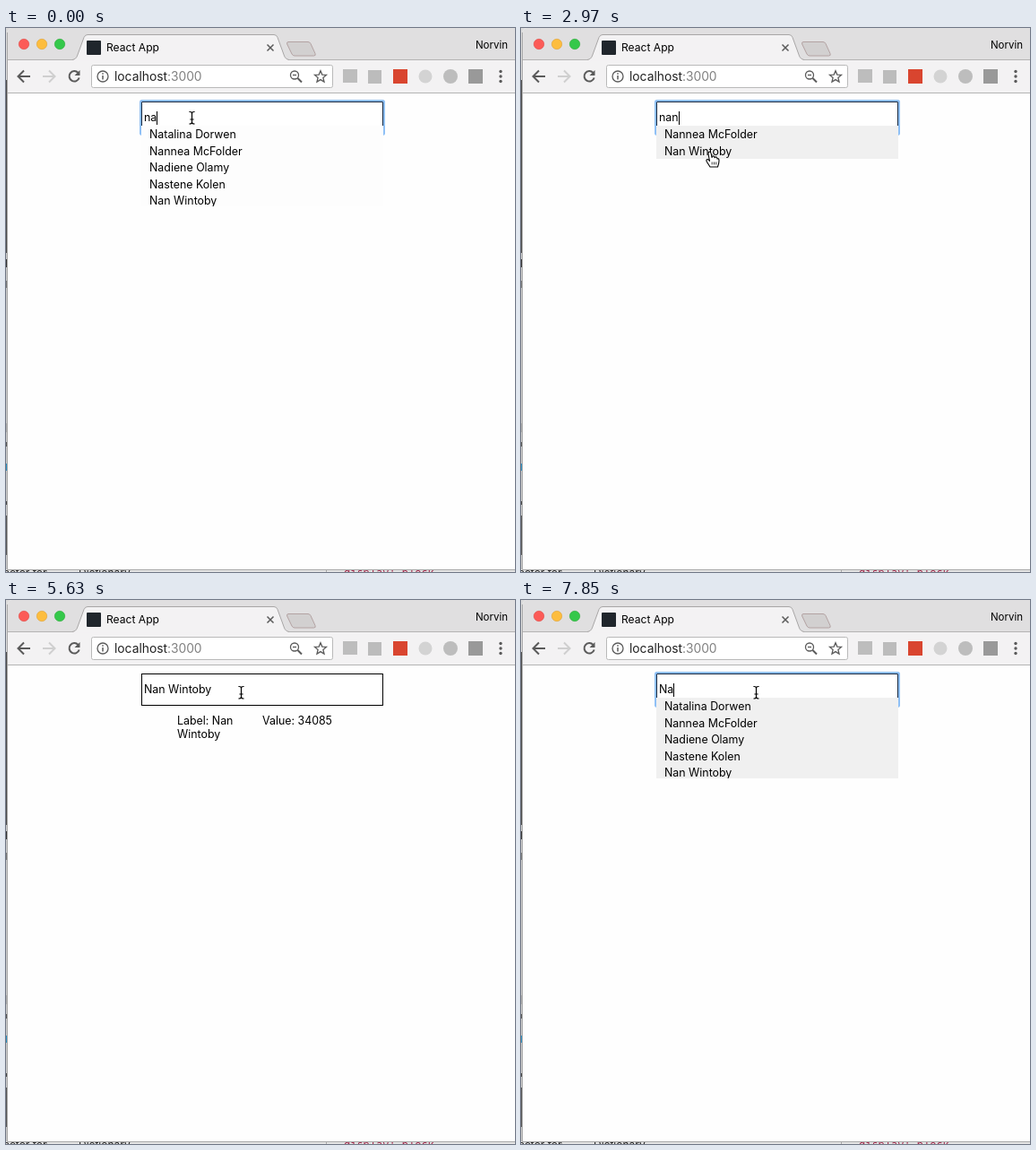
An HTML page for the animation above (8000 ms loop, 568 px wide and 607 px high).

```html
<!DOCTYPE html>
<html lang="en">
<head>
<meta charset="utf-8">
<title>Autocomplete demo</title>
<style>
  html, body { margin: 0; width: 100%; height: 100%; overflow: hidden; background: #fefefe; }
  #stage { position: relative; width: 568px; height: 607px; overflow: hidden;
    font: 12.4px/18px Inter, Roboto, sans-serif; color: #000; }
  #stage > * { position: absolute; }
  svg { left: 0; top: 0; overflow: visible; }
  #field { left: 151px; top: 82px; width: 268px; height: 34px; border: 1px solid #000; background: #fff; }
  #field.focus { border-color: #16283f; box-shadow: 0 0 0 2px #8fc0f6; border-radius: 1px; }
  #query { left: 154px; top: 91px; white-space: pre; }
  #caret { display: inline-block; width: 1px; height: 15px; margin-right: -1px; background: #000; vertical-align: -3.5px; }
  #list { left: 151px; top: 109px; width: 270px; max-height: 90px; overflow: hidden; }
  #list div { height: 18.5px; line-height: 20px; padding-left: 9px; }
  .detail { top: 127px; line-height: 15px; }
</style>
</head>
<body>
<div id="stage">
  <svg id="chrome" width="568" height="607" viewBox="0 0 568 607">
    <!-- windows behind -->
    <rect width="568" height="607" fill="#dcdcdc"/>
    <g id="edge"></g>
    <rect y="604" width="568" height="3" fill="#e4e4e4"/>
    <g font-family="Inter, sans-serif" font-size="12" fill="#222">
      <text x="-3" y="612">ector for</text>
      <text x="81" y="612">Dictionary</text>
      <text x="377" y="612" fill="#a3264a" font-family="Noto Sans Mono, monospace">display: block</text>
    </g>
    <path d="M45.5 604v3M357.5 604v3" stroke="#aaa"/>

    <!-- browser window -->
    <path d="M2 604V5Q2 0 7 0H568V604Z" fill="#fefefe"/>
    <path d="M2 36V5Q2 0 7 0H568V36Z" fill="#e0dfe0"/>
    <path d="M1.5 5V604.5H568" fill="none" stroke="#a9a9a9"/>
    <rect x="2" y="36" width="566" height="36" fill="#f3f2f3"/>
    <path d="M2 35.5H568" stroke="#b4b3b3"/>
    <path d="M2 72.5H568" stroke="#b3b3b3"/>
    <path d="M74 36.5V35.5C77 35 78.500 33.500 79.500 31L87 10.500Q88.300 7.500 91 7.500H299Q302 7.500 303 10.500L310.500 31C311.500 33.500 313 35 316 35.500V36.500Z" fill="#f3f2f3"/>
    <path d="M74 35.500C77 35 78.500 33.500 79.500 31L87 10.500Q88.300 7.500 91 7.500H299Q302 7.500 303 10.500L310.500 31C311.500 33.500 313 35 316 35.500" fill="none" stroke="#a8a6a6"/>
    <path d="M315 15.500H337Q339 15.500 340 17.500L345 28.500Q346 31 343.500 31H322Q320 31 319 29L313.700 18Q313 15.500 315 15.500Z" fill="#d2d0d0" stroke="#b3a2a2"/>
    <circle cx="20" cy="18" r="5.700" fill="#fc5b57" stroke="#df4744" stroke-width=".6"/>
    <circle cx="40" cy="18" r="5.700" fill="#fdbd3e" stroke="#dea034" stroke-width=".6"/>
    <circle cx="60" cy="18" r="5.700" fill="#34c84a" stroke="#27aa35" stroke-width=".6"/>
    <rect x="90" y="14" width="16" height="16" rx="1" fill="#20262c"/>
    <path d="M291.500 18.500l7 7m0-7l-7 7" stroke="#5a5a5a" stroke-width="1.500"/>

    <!-- toolbar -->
    <g fill="none" stroke="#5a5a5a" stroke-width="2">
      <path d="M27 54H14M20 47.500L13.500 54L20 60.500"/>
      <path d="M41 54H54M48 47.500L54.500 54L48 60.500" stroke="#cfcfcf"/>
      <path d="M80.500 50A5.700 5.700 0 1 0 81.700 55.500"/>
    </g>
    <path d="M82.500 47V53H76.500Z" fill="#5a5a5a"/>
    <rect x="95.500" y="41.500" width="269" height="25" rx="2" fill="#fff" stroke="#b9b9b9"/>
    <g fill="none" stroke="#5a5a5a" stroke-width="1.300">
      <circle cx="108" cy="54" r="6"/>
      <path d="M108 53V57.500M108 50.300V51.800" stroke-width="1.500"/>
      <circle cx="322" cy="52.500" r="4.500"/>
      <path d="M325.500 56L330 60.500" stroke-width="2"/>
      <path d="M320 52.500H324"/>
      <path d="M351 47.700L352.800 52.100L357.500 52.400L353.900 55.500L355 60.100L351 57.600L347 60.100L348.100 55.500L344.500 52.400L349.200 52.100Z"/>
    </g>
    <rect x="376" y="46" width="16" height="15" fill="#bdbdbd"/>
    <rect x="404" y="47" width="15" height="15" fill="#bcbcbc"/>
    <rect x="432" y="46" width="16" height="16" fill="#d9452f"/>
    <circle cx="468" cy="54" r="7.500" fill="#d3d3d3"/>
    <circle cx="496" cy="54" r="8" fill="#bdbdbd"/>
    <rect x="516" y="46" width="16" height="16" fill="#999"/>
    <g fill="#5a5a5a">
      <circle cx="552" cy="48.500" r="1.700"/><circle cx="552" cy="54" r="1.700"/><circle cx="552" cy="59.500" r="1.700"/>
    </g>
    <g font-family="Inter, Roboto, sans-serif" font-size="12.1">
      <text x="112" y="26">React App</text>
      <text x="560" y="23" font-size="11.500" text-anchor="end">Norvin</text>
      <text x="121" y="59" font-size="13.800" fill="#222">localhost<tspan fill="#808080">:3000</tspan></text>
    </g>
  </svg>

  <div id="field"></div>
  <div id="query"><span id="typed"></span><span id="caret"></span></div>
  <div class="detail" style="left:191px">Label: Nan<br>Wintoby</div>
  <div class="detail" style="left:286px">Value: 34085</div>
  <div id="list"></div>

  <svg id="pointer" width="1" height="1">
    <defs>
      <path id="bar" d="M-2.500 -6.500Q0 -6.500 0 -4.500Q0 -6.500 2.500 -6.500M0 -4.500V5M-2.500 7Q0 7 0 5Q0 7 2.500 7M-1.500 2H1.500"/>
    </defs>
    <g id="beam" fill="none" stroke-linecap="square">
      <use href="#bar" stroke="#fff" stroke-width="2.600"/>
      <use href="#bar" stroke="#000" stroke-width="1.200"/>
    </g>
    <g id="hand" fill="#fff" stroke="#000" stroke-width="1.100" stroke-linejoin="round">
      <path d="M-2.500 8.500L-6 3Q-7.500 .5 -5.500 0Q-4 0 -3 2L-4.500 -6Q-4.500 -8.500 -3 -8.500Q-1.800 -8.500 -1.400 -6.500L-.5 -2Q0 -4 1.500 -3.500Q2.500 -3 2.600 -1.700Q3.500 -3.200 4.700 -2.300Q5.400 -1.700 5.500 -.5Q7.500 -1.500 7.500 1.500Q7.600 4 6 8.500Z"/>
      <path d="M-.3 3V6M2 3V6M4.200 3V6" stroke-width=".8"/>
    </g>
    <path id="arrow" d="M0 0V14L3.300 11L5.500 16L7.800 15L5.600 10.200H10Z" stroke="#fff"/>
  </svg>
</div>

<script>
const LOOP = 8000;
const $ = id => document.getElementById(id);
const person = "Nan Wintoby";
const all = ["Natalina Dorwen", "Nannea McFolder", "Nadiene Olamy", "Nastene Kolen", person];
const pair = [all[1], person];

// Each step changes only the named parts of the state.
const steps = [
  [0, { text: "na", caret: 1, list: all, shade: "#fdfdfd", focus: 1, detail: 0, shape: "beam", at: [207.5, 100] }],
  [300, { caret: 0 }],
  [750, { text: "nan", caret: 1 }],
  [890, { list: pair, shade: "#f0f0f0" }],
  [1490, { caret: 0 }],
  [1940, { caret: 1 }],
  [2380, { caret: 0, shape: "hand", at: [205, 127] }],
  [2530, { at: [205, 151] }],
  [2830, { at: [213.5, 146.5] }],
  [2970, { caret: 1 }],
  [3270, { text: person, caret: 0, list: [], focus: 0, detail: 1, shape: "arrow", at: [212, 139] }],
  [3420, { at: [222, 128] }],
  [3560, { shape: "beam", at: [235, 113] }],
  [3710, { at: [245, 105] }],
  [3850, { at: [252, 101] }],
  [4000, { at: [254.5, 100] }],
  [4140, { caret: 1, list: [person], focus: 1 }],
  [4740, { caret: 0 }],
  [5030, { shape: "arrow", at: [410, 130] }],
  [5180, { at: [526, 153] }],
  [5330, { list: [], focus: 0 }],
  [5480, { at: [380, 125] }],
  [5630, { shape: "beam", at: [262.5, 103] }],
  [5930, { caret: 1, list: [person], focus: 1 }],
  ...Array.from({ length: 6 }, (_, i) => [6370 + i * 148, { text: person.slice(0, 10 - i) }]),
  [7410, { text: "Nan " }],
  [7560, { caret: 0 }],
  [7700, { text: "Nan", caret: 1, list: pair, detail: 0 }],
  [7850, { text: "Na", list: all }],
];

let state = {};
const scenes = steps.map(([t, change]) => [t, state = { ...state, ...change }]);
const show = (el, on) => el.style.visibility = on ? "visible" : "hidden";

function draw(s) {
  $("typed").textContent = s.text;
  show($("caret"), s.caret);
  $("field").classList.toggle("focus", !!s.focus);
  $("list").style.background = s.shade;
  $("list").replaceChildren(...s.list.map(name => {
    const row = document.createElement("div");
    row.textContent = name;
    return row;
  }));
  document.querySelectorAll(".detail").forEach(el => show(el, s.detail));
  for (const id of ["beam", "hand", "arrow"]) show($(id), id === s.shape);
  $("pointer").style.transform = `translate(${s.at[0]}px, ${s.at[1]}px)`;
}

// Sliver of the windows behind, down the left side: top, height, colour.
const edge = [[58, 193, "#4b4b4b"], [251, 353, "#c9c9c9"], [258, 9, "#333"], [282, 8, "#777"],
  [441, 10, "#aaa"], [462, 5, "#555"], [486, 8, "#2c8fc0"], [528, 4, "#444"], [544, 44, "#555"]];
$("edge").innerHTML = edge.map(([y, h, c]) => `<rect y="${y}" width="2" height="${h}" fill="${c}"/>`).join("");

const start = performance.now();
let current;
function tick() {
  const t = (performance.now() - start) % LOOP;
  const scene = scenes.findLast(([at]) => at <= t)[1];
  if (scene !== current) draw(current = scene);
  requestAnimationFrame(tick);
}
tick();
</script>
</body>
</html>
```
